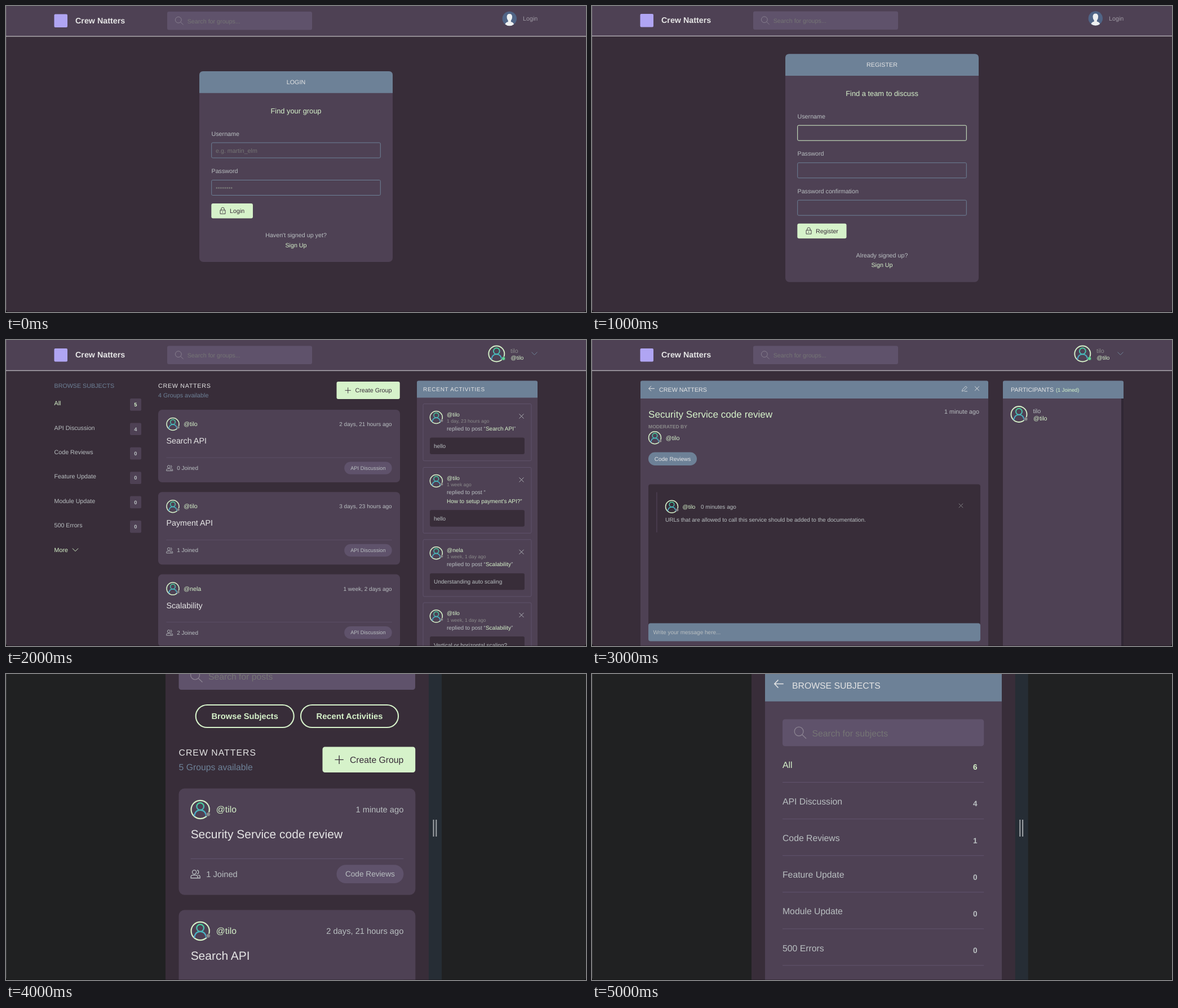
Animation of 1029 by 544 pixels, one loop 6 s. Source, as an HTML page:

```html
<!DOCTYPE html>
<html lang="en">
<head>
<meta charset="utf-8">
<title>Group chat tour</title>
<style>
  html, body { margin: 0; width: 100%; height: 100%; overflow: hidden; background: #382d39; }
  svg { display: block; width: 100%; height: 100%; }
  text { font-family: "Liberation Sans", Arial, sans-serif; text-rendering: geometricPrecision; white-space: pre; }
</style>
</head>
<body>
<svg id="stage" viewBox="0 0 1029 544" xmlns="http://www.w3.org/2000/svg"></svg>
<script>
const C = {
  bg: '#382d39', panel: '#4e4154', field: '#5f526b', blue: '#6d8197', pale: '#d6f2ca',
  light: '#e5e5e5', soft: '#b9bfc1', gray: '#8b8b8b', hint: '#757575', green: '#5dd693'
};
const SMALL = 8.58, TAG = 9.3, BODY = 10.01, TEXT = 10.73, TITLE = 14.3;
const PHONE = 1.468;
const APP = 'Crew Natters', ME = 'tilo', OTHER = 'nela';
const SUBJECTS = ['All', 'API Discussion', 'Code Reviews', 'Feature Update', 'Module Update', '500 Errors'];

// Basic shapes
const text = (x, y, str, size, fill, attrs = '') =>
  `<text x="${x}" y="${y}" font-size="${size}" fill="${fill}" ${attrs}>${str}</text>`;
const MID = 'text-anchor="middle"', END = 'text-anchor="end"', BOLD = 'font-weight="700"';
const rect = (x, y, w, h, fill, r = 0, attrs = '') =>
  `<rect x="${x}" y="${y}" width="${w}" height="${h}" rx="${r}" fill="${fill}" ${attrs}/>`;
const outline = (x, y, w, h, color, r = 2, width = 1) =>
  rect(x, y, w, h, 'none', r, `stroke="${color}" stroke-width="${width}"`);
const circle = (x, y, r, fill, attrs = '') => `<circle cx="${x}" cy="${y}" r="${r}" fill="${fill}" ${attrs}/>`;
const line = (d, color, width = 1) => `<path d="${d}" fill="none" stroke="${color}" stroke-width="${width}"/>`;
const at = (x, y, content, scale = 1) => `<g transform="translate(${x} ${y}) scale(${scale})">${content}</g>`;
const topBar = (x, y, w, h, r) =>
  `<path d="M${x} ${y + h}v${r - h}q0 ${-r} ${r} ${-r}h${w - 2 * r}q${r} 0 ${r} ${r}v${h - r}z" fill="${C.blue}"/>`;

// Icons
const cross = (x, y, r, color) =>
  line(`M${x - r} ${y - r}l${2 * r} ${2 * r}M${x + r} ${y - r}l${-2 * r} ${2 * r}`, color, 0.9);
const chevron = (x, y, color) => line(`M${x} ${y}l5 5l5 -5`, color);
const backArrow = (x, y, s) => at(x, y, line('M11 0H.7M5 -4.5L.7 0L5 4.5', C.light), s);
const lock = (x, y) => at(x, y, line('M.5 4.7h9v6.6h-9zM2.3 4.7v-2a2.7 2.7 0 0 1 5.4 0v2M5 7v2.2', C.bg, 0.9));
const people = (x, y) => at(x, y,
  circle(-1.5, -2.2, 2.4, 'none', `stroke="${C.soft}" stroke-width=".9"`) +
  line('M-5.6 5v-1.3q0 -2.2 2.2 -2.2h3.8q2.2 0 2.2 2.2v1.3zM1.8 -4.6a2.4 2.4 0 0 1 0 4.7M3.4 1.5q2 .2 2 2.2v1.3h-2.6', C.soft, 0.9));
const avatar = (x, y, r, dot = C.gray) => at(x, y,
  circle(0, 0, 11, 'none', `stroke="${C.pale}" stroke-width="1.5"`) +
  circle(0, -3.7, 4.3, 'none', 'stroke="url(#person)" stroke-width="1.5"') +
  line('M-7.2 8.2C-6.6 3 -3.6 .7 0 .7S6.6 3 7.2 8.2', 'url(#person)', 1.5) +
  circle(9.6, 5.8 + (r > 12 ? 0.8 : 0), 2.5, dot, `stroke="${C.panel}" stroke-width=".5"`), r / 11);

// Page parts
const searchBox = (x, y, w, label, s = 1) => at(x, y,
  rect(0, 0, w / s, 32.5, C.field, 3) +
  circle(19.8, 14.7, 5.4, 'none', 'stroke="#8b8391" stroke-width=".9"') +
  line('M23.6 18.5l5 4.8', '#8b8391', 0.9) +
  text(35.7, 20.5, label, TEXT, C.hint), s);

const guest = circle(893.3, 22.5, 12.7, '#506486') +
  '<path d="M885.5 32.4q.8 -3.4 5.2 -4.2v-2.4q-2.2 -2.2 -2.2 -6.2q0 -5.6 4.8 -5.6t4.8 5.6q0 4 -2.2 6.2v2.4q4.4 .8 5.2 4.2q-3.2 2.8 -7.8 2.8t-7.8 -2.8z" fill="#eef0f1"/>' +
  text(917, 26, 'Login', TEXT, '#a09ba5');
const member = avatar(870.3, 24, 14, C.green) +
  text(895, 22, ME, TEXT, C.gray) + text(895.5, 34, '@' + ME, BODY, C.pale) + chevron(932.5, 21, C.blue);

const header = (dy, user) => rect(0, 0, 1029, 54, C.panel) + at(0, dy,
  rect(0, 53.2, 1029, 1.4, '#b3afb5') + rect(85.5, 14.5, 23.5, 23.5, '#b0a5f3', 2) +
  text(123, 30.5, APP, TITLE, C.light, BOLD) + searchBox(286, 10, 257, 'Search for groups...') + user);

function form(top, { title, heading, fields, action, question }) {
  const button = top + 102 + 66.5 * fields.length;
  let out = rect(343, top, 343, button + 104 - top, C.panel, 7) + topBar(343, top, 343, 38.7, 7) +
    text(514.5, top + 23, title, TEXT, C.light, MID) +
    text(514.5, top + 74.5, heading, 12.87, C.pale, MID);
  fields.forEach(({ label, hint = '', color = C.blue }, i) => {
    const y = top + 66.5 * i;
    out += text(364.5, y + 114.5, label, TEXT, C.soft) + outline(364.7, y + 127, 299.6, 27, color) +
      text(372, y + 144.5, hint, TEXT, C.hint);
  });
  return out + rect(364.3, button, action === 'Login' ? 73.7 : 87.2, 26.5, C.pale, 3) + lock(379.5, button + 7.2) +
    text(397, button + 17.3, action, TEXT, C.bg) +
    text(514.5, button + 60.3, question, TEXT, C.soft, MID) +
    text(514.5, button + 77.5, 'Sign Up', TEXT, C.pale, MID);
}

const createButton = (x, y, s = 1) => at(x, y,
  rect(0, 0, 112.2, 31, C.pale, 3) + line('M15 15.6h10.4M20.2 10.4v10.4', C.bg, 0.9) +
  text(33, 19.4, 'Create Group', TEXT, C.bg), s);

const groupCard = (x, y, w, { user, age, title, joined, tag, tagWidth = 84.5 }, s = 1) => at(x, y,
  rect(0, 0, w, 129, C.panel, 7) + avatar(26, 25.5, 11) +
  text(45.2, 29.2, '@' + user, TEXT, C.pale) +
  text(w - 14.3, 29, age, BODY, C.soft, END) +
  text(14.4, 60, title, TITLE, C.light) + rect(14.3, 84.7, w - 28.6, 0.75, C.field) +
  people(20.3, 103.5) + text(33.2, 107, joined + ' Joined', BODY, C.soft) +
  rect(w - 14.3 - tagWidth, 92.4, tagWidth, 22.4, C.field, 11.2) +
  text(w - 14.3 - tagWidth / 2, 106.5, tag, TAG, C.soft, MID), s);

function activity(y, user, age, post, message, wrapped) {
  const extra = wrapped ? 15.7 : 0;
  const link = `<tspan fill="${C.pale}">${post}</tspan>”`;
  return at(740, y, outline(0, 0, 192, 101.2 + extra, C.field, 2) + avatar(23.3, 24, 11) +
    text(42, 22, '@' + user, BODY, C.pale) + text(42, 33.5, age, SMALL, C.gray) +
    text(42, 47.5, 'replied to post “' + (wrapped ? '' : link), BODY, C.soft) +
    (wrapped ? text(42, 63, link, BODY, C.pale) : '') + cross(174.5, 22, 4, C.soft) +
    rect(12, 60 + extra, 168, 29.5, C.bg, 3) + text(19, 78.5 + extra, message, BODY, C.soft));
}

const searchApi = { user: ME, age: '2 days, 21 hours ago', title: 'Search API', joined: 0, tag: 'API Discussion' };
const spacedName = (x, y, size) => text(x, y, APP.toUpperCase(), size, C.light, `letter-spacing="${size / 15}"`);

// Scenes
const login = () => header(0, guest) + form(116, {
  title: 'LOGIN', heading: 'Find your group', action: 'Login', question: "Haven't signed up yet?",
  fields: [{ label: 'Username', hint: 'e.g. martin_elm' }, { label: 'Password', hint: '••••••••' }]
});

const register = () => header(-0.5, guest) + form(85.2, {
  title: 'REGISTER', heading: 'Find a team to discuss', action: 'Register', question: 'Already signed up?',
  fields: [{ label: 'Username', color: C.pale }, { label: 'Password' }, { label: 'Password confirmation' }]
});

function home() {
  const subjects = SUBJECTS.map((name, i) => {
    const color = i ? C.soft : C.pale;
    return at(85.5, 104 + 43.4 * i, text(0, 12.2, name, TEXT, color) + rect(134.5, 0, 20, 21.7, C.panel, 2) +
      text(144.3, 14.2, [5, 4, 0, 0, 0, 0][i], TAG, color, MID + BOLD));
  }).join('');
  const groups = [
    searchApi,
    { ...searchApi, age: '3 days, 23 hours ago', title: 'Payment API', joined: 1 },
    { ...searchApi, user: OTHER, age: '1 week, 2 days ago', title: 'Scalability', joined: 2 }
  ].map((group, i) => groupCard(270, 124 + 146.3 * i, 429, group)).join('');
  return header(0.5, member) + text(85.5, 84.5, 'BROWSE SUBJECTS', TEXT, C.blue) + subjects +
    text(85.5, 376.5, 'More', TEXT, C.pale) + chevron(118, 370.5, C.pale) +
    spacedName(270, 84.5, TEXT) + text(270, 102, '4 Groups available', TEXT, C.blue) +
    createButton(586.5, 74) + groups +
    rect(729, 72.5, 214, 480, C.panel, 3) + topBar(729, 72.5, 214, 30, 3) +
    text(740, 91, 'RECENT ACTIVITIES', BODY, C.light, 'letter-spacing=".715"') +
    activity(113.5, ME, '1 day, 23 hours ago', 'Search API', 'hello') +
    activity(226.5, ME, '1 week ago', "How to setup payment's API?", 'hello', true) +
    activity(354.8, OTHER, '1 week, 1 day ago', 'Scalability', 'Understanding auto scaling') +
    activity(467, ME, '1 week, 1 day ago', 'Scalability', 'Vertical or horizontal scaling?');
}

const room = () => header(0.5, member) +
  rect(86, 72.5, 617, 480, C.panel, 3) + topBar(86, 72.5, 617, 31.5, 3) +
  backArrow(100, 86.3, 1) + text(119, 92, APP.toUpperCase(), TEXT, C.light) +
  line('M656.5 91.2l.8 -3.2l5.8 -5.8l2.2 2.2l-5.8 5.8zM660.5 91.2h5.5', C.light, 0.8) + cross(683, 86.3, 3.8, C.light) +
  text(100, 137.5, 'Security Service code review', 17.16, C.pale) + text(687, 130.5, '1 minute ago', TEXT, C.soft, END) +
  text(100, 156.7, 'MODERATED BY', SMALL, C.gray, BOLD) +
  avatar(111.5, 173.8, 11) + text(130.8, 177.5, '@' + ME, TEXT, C.pale) +
  rect(100, 199.5, 86, 23.5, C.blue, 11.7) + text(143, 214.7, 'Code Reviews', BODY, C.light, MID) +
  rect(100, 256.5, 589, 278, C.bg, 4) + rect(114.2, 270.5, 1.4, 71.5, C.panel) +
  avatar(141.5, 296.2, 11) + text(160.5, 300, '@' + ME, BODY, C.pale) + text(193, 300, '0 minutes ago', BODY, C.soft) +
  cross(654.5, 294.5, 3.7, C.gray) +
  text(130, 323, 'URLs that are allowed to call this service should be added to the documentation.', BODY, C.soft) +
  rect(100, 503.5, 589, 32, C.blue, 4) + text(108.5, 523, 'Write your message here...', BODY, C.soft) +
  rect(729, 72.5, 214, 480, C.panel, 3) + rect(939, 104, 4, 440, '#302734') + topBar(729, 72.5, 214, 31.5, 3) +
  text(743, 91.7, 'PARTICIPANTS', TEXT, C.light) + text(823, 91.5, '(1 Joined)', TAG, C.pale) +
  avatar(757.5, 132, 14) + text(782.5, 130, ME, TEXT, C.soft) + text(783, 142.7, '@' + ME, TEXT, C.pale);

// Narrow device preview with its resize handle
const device = (dx, content) => rect(0, 0, 1029, 544, '#202122') + rect(283, 0, 468, 544, C.bg) +
  rect(750 + dx, 0, 23, 544, '#262d35') +
  rect(757.5 + dx, 259, 2, 30, '#a0a4a8') + rect(762.3 + dx, 259, 2, 30, '#a0a4a8') + content;

const pill = (x, w, label) => outline(x, 55, w, 40, C.pale, 20, 2.1) +
  text(x + w / 2, 79.8, label, 14.7, C.pale, MID + BOLD);

const phoneHome = () => device(0,
  searchBox(306.5, -19.7, 419.5, 'Search for posts', PHONE) +
  pill(336.7, 174, 'Browse Subjects') + pill(523, 173, 'Recent Activities') +
  spacedName(306.5, 145, 15.75) + text(306.5, 170.7, '5 Groups available', 15.75, C.blue) +
  createButton(561.5, 129.5, PHONE) +
  groupCard(306.5, 203.5, 286, { user: ME, age: '1 minute ago', title: 'Security Service code review',
    joined: 1, tag: 'Code Reviews', tagWidth: 81 }, PHONE) +
  groupCard(306.5, 419.5, 286, searchApi, PHONE));

const phoneSubjects = () => device(0.8,
  rect(307, 0, 420, 544, C.panel) + rect(307, 0, 420, 48.7, C.blue) +
  backArrow(322.7, 17.5, 1.55) + text(355, 25.7, 'BROWSE SUBJECTS', 15.75, C.light) +
  searchBox(338, 80.5, 357.3, 'Search for subjects', PHONE) +
  SUBJECTS.map((name, i) => at(338, 65.1 * i, text(0, 167, name, 15.75, i ? C.soft : C.pale) +
    text(341.7, 170.4, [6, 4, 1, 0, 0, 0][i], 13.65, i ? C.soft : C.pale, MID + BOLD) +
    rect(0, 192, 357.3, 1.1, C.field))).join(''));

const windowEdge = rect(0, 0, 1, 544, '#fff', 0, 'opacity=".13"') + rect(0, 543, 1029, 1, '#000', 0, 'opacity=".3"') +
  '<path d="M0 544v-5q0 5 5 5zM1029 544v-5q0 5 -5 5z" fill="#111"/>';

const scenes = [login, register, home, room, phoneHome, phoneSubjects];
const stage = document.getElementById('stage');
stage.innerHTML = `<defs><linearGradient id="person" gradientUnits="userSpaceOnUse" x1="0" y1="-8" x2="0" y2="8">
  <stop offset="0" stop-color="#45d39c"/><stop offset="1" stop-color="#4aa5d8"/></linearGradient></defs>` +
  rect(0, 0, 1029, 544, C.bg) + scenes.map(scene => `<g class="scene">${scene()}</g>`).join('') + windowEdge;

const layers = [...stage.querySelectorAll('.scene')];
function play() {
  const current = Math.floor(performance.now() / 1000) % layers.length;
  layers.forEach((layer, i) => { layer.style.display = i === current ? '' : 'none'; });
  requestAnimationFrame(play);
}
play();
</script>
</body>
</html>
```
